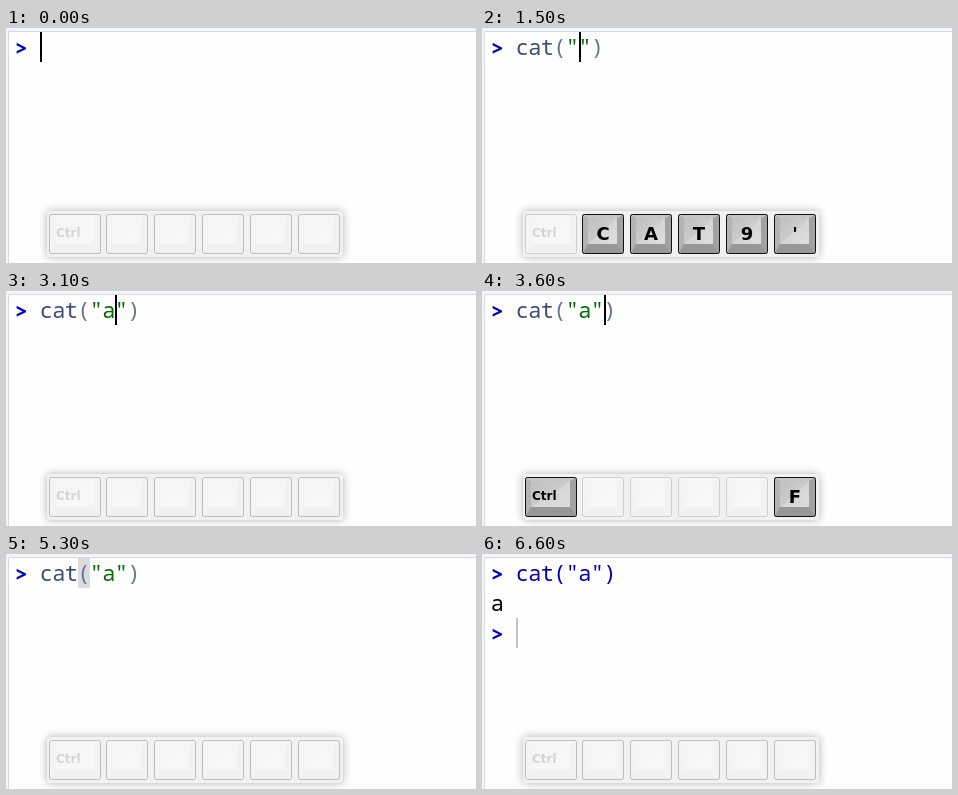
Animation, 470 px wide and 235 px high, one loop 6.7 s. Source, as an HTML page:

```html
<!DOCTYPE html>
<html lang="en">
<head>
<meta charset="utf-8">
<title>Console typing</title>
<style>
  html, body { margin: 0; width: 100%; height: 100%; overflow: hidden; background: #fefefe; }
  svg { display: block; }
  .code { font: 500 22px "Noto Sans Mono", "DejaVu Sans Mono", monospace; letter-spacing: -0.7px; white-space: pre; }
  .prompt { font-weight: 700; }
  .cap { font: bold 18px "DejaVu Sans", sans-serif; text-anchor: middle; }
  .cap.word { font-size: 12px; text-anchor: start; }
  .panel { fill: #f1f1f1; filter: drop-shadow(0 0 4px rgba(0, 0, 0, .3)); }
</style>
</head>
<body>
<svg id="stage" width="470" height="235" viewBox="0 0 470 235">
  <defs>
    <linearGradient id="face" x1="0" y1="0" x2="1" y2="1">
      <stop offset="0" stop-color="#c0c0c0"/>
      <stop offset=".5" stop-color="#cbcbcb"/>
      <stop offset=".52" stop-color="#d6d6d6"/>
      <stop offset="1" stop-color="#dedede"/>
    </linearGradient>
  </defs>
  <rect width="470" height="235" fill="#fefefe"/>
  <path d="M0 0H470V3H2V235H0Z" fill="#f3f6f9"/>
  <path d="M2.5 235V3.5H470" fill="none" stroke="#d3dae4"/>
</svg>
<script>
const LOOP = 6700, CELL = 12.5, LEFT = 9;
const BLUE = '#0000c0', FUNC = '#3c4c72', PAREN = '#687687', STRING = '#036a07';
const stage = document.getElementById('stage');

function add(parent, tag, attrs = {}, text = '') {
  const node = document.createElementNS('http://www.w3.org/2000/svg', tag);
  for (const name in attrs) node.setAttribute(name, attrs[name]);
  node.textContent = text;
  parent.appendChild(node);
  return node;
}

const show = (node, on) => node.setAttribute('visibility', on ? 'visible' : 'hidden');
const colX = col => Math.round(LEFT + CELL * col);

// Console
const mark = add(stage, 'rect', { x: colX(5), y: 4, width: 12, height: 30, fill: '#dcdcdf' });
const codeLine = (col, row, text) =>
  add(stage, 'text', { class: 'code', x: LEFT + CELL * col - 0.35, y: 27 + 30 * row }, text);
const promptLine = row =>
  add(stage, 'text', { class: 'code prompt', x: LEFT - 0.35, y: 28 + 30 * row, fill: BLUE }, '>');
promptLine(0);
const input = codeLine(2, 0, '');
const output = [codeLine(0, 1, 'a'), promptLine(2)];
const cursor = add(stage, 'rect', { width: 2, height: 30 });

function setInput(text, done) {
  input.textContent = '';
  const parts = text.match(/"\w*"|[()]|\w+/g) || [];
  const called = text.includes('(');
  for (const part of parts) {
    const fill = done ? BLUE : part[0] === '"' ? STRING : /[()]/.test(part) ? PAREN : called ? FUNC : '#000';
    add(input, 'tspan', { fill }, part);
  }
}

// Key display
const panel = add(stage, 'rect', { class: 'panel', x: 41, y: 183, width: 296, height: 46, rx: 3 });

function makeKey(x, w, word = '') {
  const group = add(stage, 'g', { transform: `translate(${x} 186)` });
  add(group, 'rect', { width: w, height: 40, rx: 2, fill: '#fafafa' });
  const body = add(group, 'g');
  const r = w - 7;
  add(body, 'rect', { width: w, height: 40, rx: 2, fill: '#b4b4b4' });
  add(body, 'path', { d: `M1 1H${w - 1}L${r} 4H6Z`, fill: '#c6c6c6' });
  add(body, 'path', { d: `M${w - 1} 1V39L${r} 30V4Z`, fill: '#a2a2a2' });
  add(body, 'path', { d: `M1 39L6 30H${r}L${w - 1} 39Z`, fill: '#979797' });
  add(body, 'rect', { x: 6, y: 4, width: w - 13, height: 26, fill: 'url(#face)' });
  const cap = add(group, 'text', { class: word ? 'cap word' : 'cap', x: word ? 7 : w / 2, y: word ? 23 : 26 }, word);
  const edge = add(group, 'rect', { x: 0.5, y: 0.5, width: w - 1, height: 39, rx: 2, fill: 'none', stroke: '#111' });
  return { group, body, cap, edge };
}

function setKey(key, lit, idle) {
  key.body.setAttribute('opacity', lit ? 1 : 0.08);
  key.cap.setAttribute('opacity', lit ? 1 : 0.13);
  key.edge.setAttribute('stroke-opacity', lit ? 1 : idle ? 0.24 : 0.16);
}

const ctrl = makeKey(43, 52, 'Ctrl');
const letters = [100, 148, 196, 244, 292].map(x => makeKey(x, 42));
const enter = makeKey(292, 68, 'Enter');

// Each step changes only the listed values; "at" is the cursor column.
const START = { text: '', at: 2, row: 0, blink: 1, keys: '     ', ctrl: 0, enter: 0, mark: 0, done: 0 };
const STEPS = [
  [300, { keys: '    C' }],
  [500, { text: 'c', at: 3 }],
  [700, { text: 'cat', at: 5, keys: '  CAT' }],
  [1000, { keys: ' CAT9' }],
  [1300, { text: 'cat()', at: 6, keys: "CAT9'" }],
  [1500, { text: 'cat("")', at: 7 }],
  [1800, { keys: "AT9'A" }],
  [2000, { text: 'cat("a")', at: 8 }],
  [2400, { keys: "AT9' " }],
  [2500, { keys: 'AT9  ', blink: 0 }],
  [2800, { keys: 'AT   ', blink: 1 }],
  [3000, { keys: 'A    ' }],
  [3100, { keys: '     ' }],
  [3400, { ctrl: 1, blink: 0 }],
  [3600, { keys: '    F', at: 9, blink: 1 }],
  [4100, { blink: 0 }],
  [4200, { keys: '     ', ctrl: 0 }],
  [4400, { ctrl: 1 }],
  [4600, { keys: '    F' }],
  [4700, { at: 10, blink: 1 }],
  [5000, { mark: 1 }],
  [5200, { blink: 0 }],
  [5300, { keys: '     ', ctrl: 0 }],
  [5600, { enter: 1 }],
  [6000, { done: 1, mark: 0, at: 2, row: 2, blink: 1 }],
  [6200, { enter: 0 }],
  [6300, { blink: 0 }],
  [6600, { blink: 0.22 }]
];

function draw(time) {
  const past = STEPS.filter(([start]) => start <= time);
  const s = Object.assign({}, START, ...past.map(step => step[1]));

  setInput(s.text, s.done);
  output.forEach(line => show(line, s.done));
  show(mark, s.mark);
  cursor.setAttribute('x', colX(s.at));
  cursor.setAttribute('y', 4 + 30 * s.row);
  cursor.setAttribute('opacity', s.blink);

  const idle = !s.ctrl && !s.enter && !s.keys.trim();
  setKey(ctrl, s.ctrl, idle);
  letters.forEach((key, i) => {
    key.cap.textContent = s.keys[i].trim();
    setKey(key, s.keys[i] !== ' ', idle);
  });
  setKey(enter, s.enter, idle);
  show(enter.group, s.enter);
  show(letters[4].group, !s.enter);
  panel.setAttribute('width', s.enter ? 322 : 296);
}

const begin = performance.now();
let shown = -1;
function tick() {
  const time = (performance.now() - begin) % LOOP;
  const count = STEPS.filter(([start]) => start <= time).length;
  if (count !== shown) draw(time);
  shown = count;
  requestAnimationFrame(tick);
}
tick();
</script>
</body>
</html>
```
